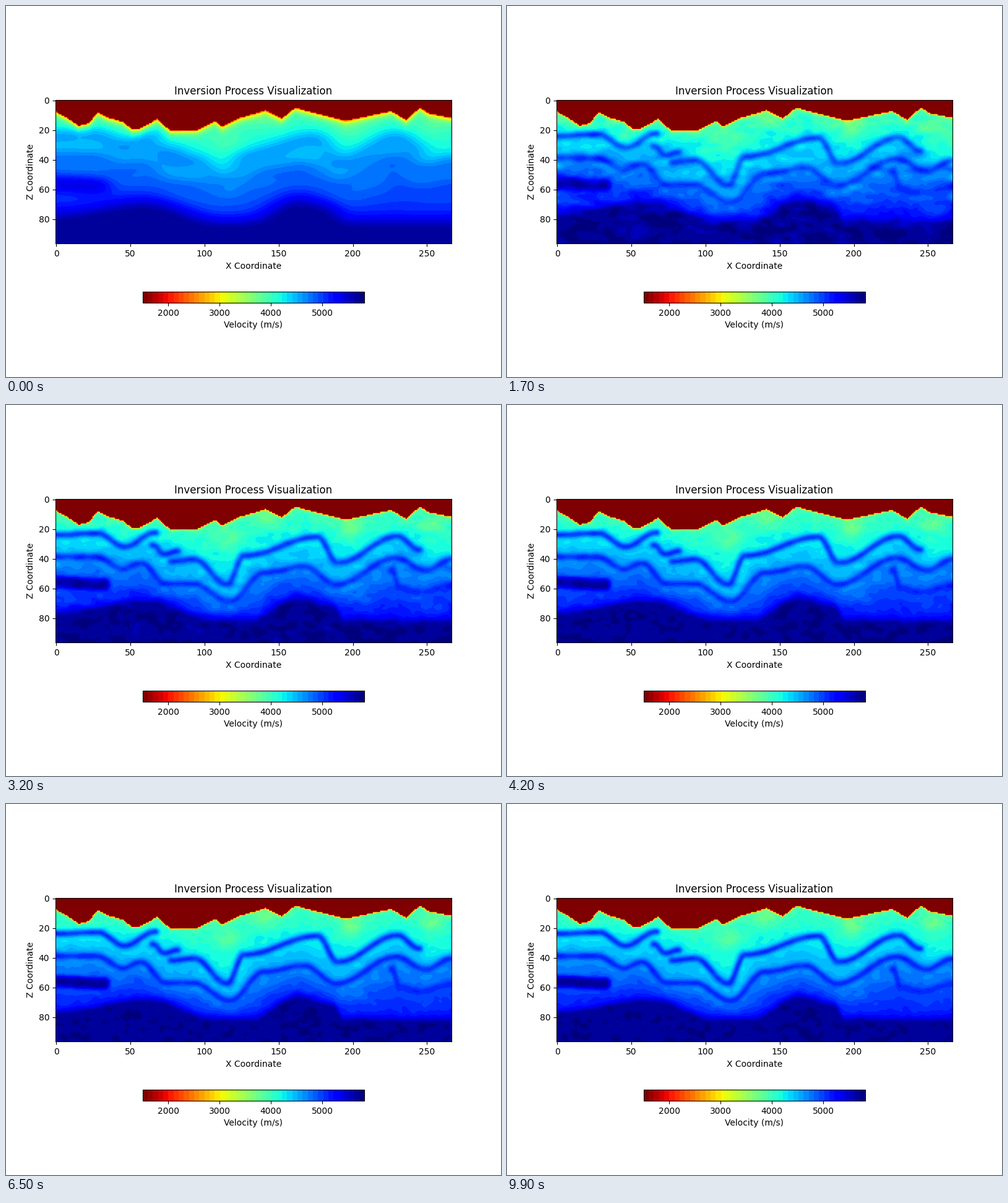
A matplotlib script that plays this animation: 800x600 px, repeating every 10 s.

```python
import matplotlib.pyplot as plt
import numpy as np
from matplotlib.animation import FuncAnimation

NX, NZ, FRAMES = 267, 97, 100
VMIN, VMAX, LEVELS = 1500, 5818, 43
xs = np.arange(NX)
X, Z = np.meshgrid(xs, np.arange(NZ))
rng = np.random.default_rng(7)

# Peaks and valleys as (x, z) in grid units
SURFACE = [(0, 8), (7, 11.7), (15, 17.3), (22, 15.5), (28, 8.3), (34, 11.5),
           (45, 14.6), (51, 19.7), (56, 19.5), (68, 12.8), (77, 20.7),
           (95, 20.3), (107, 14.2), (112, 17.8), (124, 12), (141, 7),
           (152, 12.5), (161, 5.2), (195, 14), (226, 7.4), (236, 13.5),
           (245, 5.2), (251, 8.8), (266, 12)]
SHALLOW = [(0, 25), (70, 25), (115, 46), (140, 30), (172, 25), (196, 36),
           (234, 22), (255, 38)]
UPPER_WEST = [(0, 24), (28, 23), (46, 32), (67, 22.5)]
UPPER_EAST = [(77, 42), (93, 40.5), (115, 57.5), (127, 38), (176, 25.5),
              (190, 43), (230, 25), (245, 34)]
LOWER = [(0, 39), (27, 39), (45, 47), (57, 43), (74, 57), (92, 57), (117, 69),
         (140, 49.5), (167, 45.5), (189, 57.5), (229, 39.5), (249, 48), (266, 41)]
BASEMENT = [(0, 76), (62, 68), (108, 81), (130, 81), (163, 66), (186, 71),
            (194, 81)]
FAULT_WEST = [(65, 31), (73, 37), (82, 35)]
FAULT_EAST = [(226, 48), (232, 60), (245, 63), (266, 58)]
LENS = [(0, 56), (32, 57.5)]
SLOW_POCKETS = [(115, 28), (199, 19), (253, 17), (140, 13)]


def curve(points):
    """Depth per column, eased from each turning point to the next."""
    px, pz = np.transpose(points)
    i = np.clip(np.searchsorted(px, xs, "right") - 1, 0, len(px) - 2)
    t = np.clip((xs - px[i]) / (px[i + 1] - px[i]), 0, 1)
    return pz[i] + (pz[i + 1] - pz[i]) * (1 - np.cos(np.pi * t)) / 2


def distance(points):
    """Approximate distance from each cell to a curve with finite ends."""
    z = curve(points)
    across = (Z - z) / np.hypot(1, np.gradient(z))
    beyond = np.maximum(0, np.maximum(points[0][0] - X, X - points[-1][0]))
    return np.hypot(across, beyond)


def sigmoid(d):
    return 1 / (1 + np.exp(-d))


def blur(a, sx, sz):
    for axis, s in ((0, sz), (1, sx)):
        r = int(3 * s) + 1
        kernel = np.exp(-0.5 * (np.arange(-r, r + 1) / s) ** 2)
        pad = [(0, 0), (0, 0)]
        pad[axis] = (r, r)
        a = np.apply_along_axis(np.convolve, axis, np.pad(a, pad, mode="edge"),
                                kernel / kernel.sum(), "valid")
    return a


def noise(sx, sz):
    n = blur(rng.standard_normal(X.shape), sx, sz)
    return n / n.std()


def build_model():
    base = curve(BASEMENT)
    knots = np.maximum.accumulate(
        [surface, curve(SHALLOW), curve(LOWER), base], axis=0)
    v = np.transpose([np.interp(np.arange(NZ), k, [3980, 4220, 4580, 5200])
                      for k in knots.T])
    v = blur(v, 4, 1.5)
    for x, z in SLOW_POCKETS:
        v -= 270 * np.exp(-((X - x) / 8) ** 2 - ((Z - z) / 6) ** 2)
    for line in (UPPER_WEST, UPPER_EAST, LOWER, FAULT_WEST, FAULT_EAST):
        v += (5150 - v) * 0.95 * np.exp(-(distance(line) / 2.2) ** 2)
    v += (5690 - v) * sigmoid((3.6 - distance(LENS)) / 0.6)
    v += (5700 - v) * sigmoid((Z - base) / 0.9)
    return blur(v, 0.6, 0.6)


surface = np.interp(xs, *np.transpose(SURFACE))
below = Z - surface
sharp = build_model()
medium = blur(sharp, 2.6, 1.6)
smooth = blur(sharp, 6, 3.8)
ripple_a, ripple_b, grain = noise(4, 1.5), noise(2.5, 1.5), noise(1.8, 1.3)


def velocity(k):
    # Broad features settle first, fine ones later and later with depth
    coarse = 1 - np.exp(-k / 9)
    fine = 1 - np.exp(-k / (10 + Z / 4))
    v = smooth + coarse * (medium - smooth) + fine * (sharp - medium)
    ripple = 120 * (1 - np.exp(-k / 5)) * np.exp(-k / 26)
    turn = k / 22
    v += ripple * (np.cos(turn) * ripple_a + np.sin(turn) * ripple_b)
    v += 25 * coarse * grain
    # Slow skin under the surface gets thinner
    skin = np.exp(-k / 11)
    v -= (650 + 750 * skin) * np.exp(-np.maximum(below, 0) / (0.6 + 1.5 * skin))
    return np.where(below < 0, VMIN, np.clip(v, VMIN, VMAX))


fig = plt.figure(figsize=(8, 6), dpi=100)
ax = fig.add_axes([0.1, 215.7 / 600, 0.8, 232.5 / 600])
im = ax.imshow(velocity(0), cmap=plt.get_cmap("jet_r", LEVELS), vmin=VMIN,
               vmax=VMAX, aspect="auto")
ax.set_title("Inversion Process Visualization")
ax.set_xlabel("X Coordinate")
ax.set_ylabel("Z Coordinate")
cax = fig.add_axes([0.276, 119.8 / 600, 0.448, 17.92 / 600])
fig.colorbar(im, cax=cax, orientation="horizontal", label="Velocity (m/s)",
             ticks=[2000, 3000, 4000, 5000])


def update(k):
    im.set_data(velocity(k))
    return [im]


anim = FuncAnimation(fig, update, frames=FRAMES, interval=100, repeat=True)
plt.show()
```
